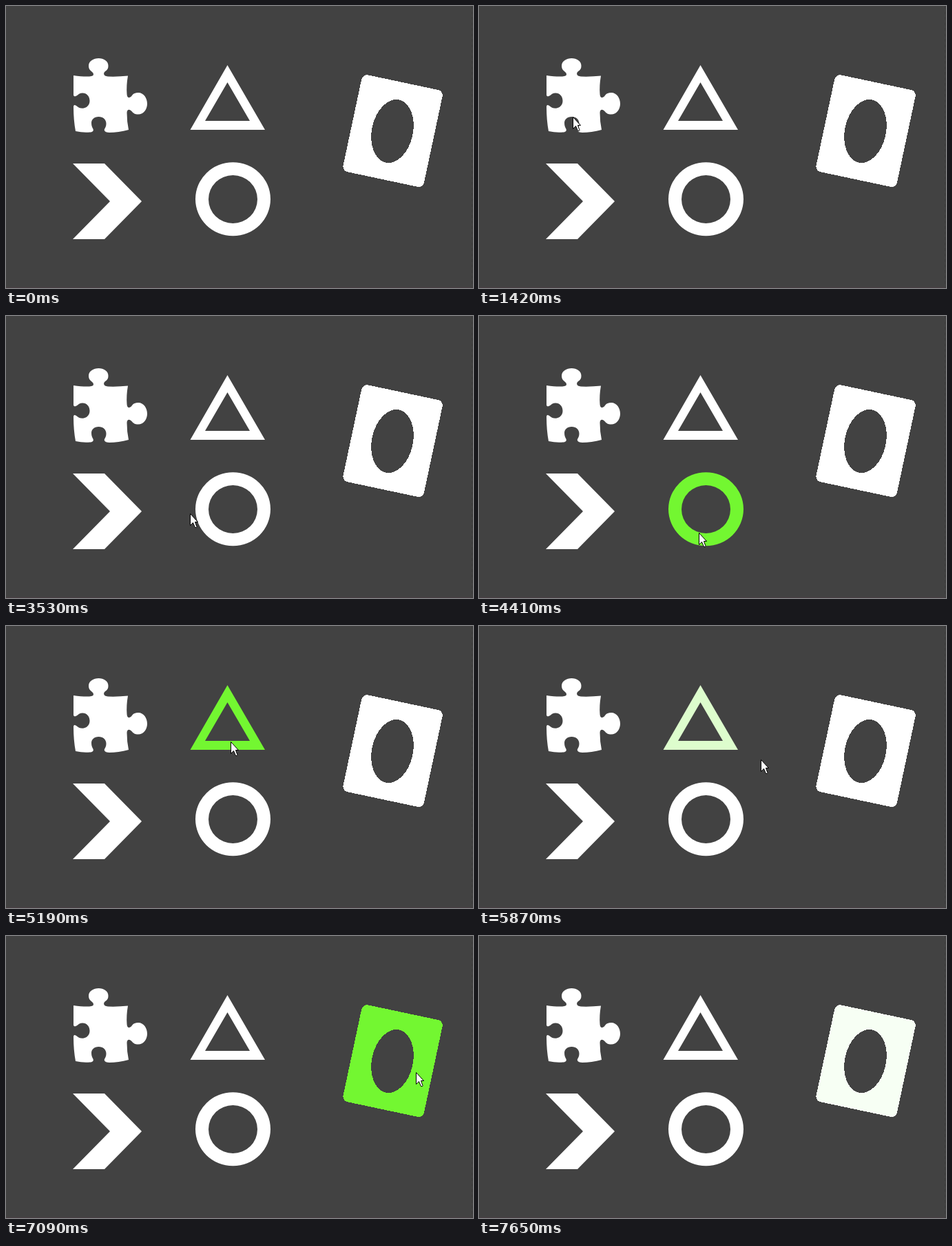
An HTML page that plays this animation: 678x410 px, repeating every 8 s.

```html
<!DOCTYPE html>
<html lang="en">
<head>
<meta charset="utf-8">
<title>Shape hover</title>
<style>
  html, body { margin: 0; width: 100%; height: 100%; overflow: hidden; background: #424242; }
  svg { display: block; width: 678px; height: 410px; }
  .shape { fill: #fff; fill-rule: evenodd; }
</style>
</head>
<body>
<svg viewBox="0 0 678 410">
  <rect width="678" height="410" fill="#424242"/>
  <rect y="409" width="678" height="1" fill="#493e43"/>
  <path d="M676.5 0V410" stroke="#3b3b3b" stroke-dasharray="4 4"/>

  <!-- puzzle piece -->
  <path class="shape" d="M98 101Q112 103 121 102.5C130 102 127 97 124 95C121 93 120 90 120 87
    C120 80 127 76 134.5 76C142 76 148.5 80 148.5 87C148.5 91 147 93 144 95C141 97 141 102 148 102.5
    Q163 103 177 101.5Q174.5 116 175.5 128C176 136 181 133 183 130C185 127 188 126 192 126
    C200 126 205 134 205 142C205 150 200 157.5 192 157.5C187 157.5 185 156 183 153.5
    C180 150 176 149 175.5 155Q175.5 168 178 180Q163 184 150 184C144 184 142 181 143 179
    C144 177 145.5 175 145.5 171C145.5 165 141 161 134.5 161C128 161 124 165 124 170
    C124 174 125 176 126 178C128 181 126 183.5 122 183.5Q112 184.5 101 182Q98 166 98 147
    C98 142 101 144 104 146.5C106 148 108 148.7 111 148.7C117 148.7 121.5 144 121.5 138
    C121.5 131 117 126.5 111 126.5C108 126.5 106 127.5 104 129.5C101 132 98 132 98 129Z"/>
  <!-- triangle -->
  <path class="shape" d="M321.5 86L376 180H267.5ZM321.5 111L289 167H354Z"/>
  <!-- chevron -->
  <path class="shape" d="M97 229H143L197 284L143 339H97L151 284Z"/>
  <!-- ring -->
  <path class="shape" d="M275 280.8a54.5 53.5 0 0 1 109 0a54.5 53.5 0 0 1 -109 0Z
    M294 281a35.5 35 0 0 1 71 0a35.5 35 0 0 1 -71 0Z"/>
  <!-- card -->
  <path class="shape" transform="translate(561 182) rotate(12)" shape-rendering="crispEdges"
    d="M-51.5 -72.5h104a8 8 0 0 1 8 8v128a8 8 0 0 1 -8 8h-104a8 8 0 0 1 -8 -8v-128a8 8 0 0 1 8 -8Z
    M-29.9 0a29.9 46.6 0 0 1 59.8 0a29.9 46.6 0 0 1 -59.8 0Z"/>

  <path id="cursor" fill="#fff" stroke="#000"
    d="M-.5 -.5V16.5L3.5 12.5L6.5 19.5H8.5L9 18.5L6.5 11.5H10.5Z"/>
</svg>
<script>
const LOOP = 8000;
const STEP = 1000 / 9;   // the picture advances nine times a second
const LEAD = 74;
const LAST = 68;         // nothing moves after this step
const FADE = 240 / STEP; // fade length in steps
const GREEN = [115, 247, 49];

// Turning points of the cursor tip: step, x, y. Both ends lie off stage.
const route = [
  [-1, 690, 480], [0, 481, 371], [7, 157, 193], [9, 139, 192], [12, 137, 162],
  [13, 135, 150], [15, 135, 150], [20, 111, 241], [21, 111, 241], [23, 125, 276],
  [29, 255, 281], [39, 320, 316], [45, 326, 174], [48, 330, 160], [50, 356, 176.5],
  [52, 410, 195], [53, 474, 203], [56, 543, 205], [58, 556, 205], [66, 620, 196],
  [67, 700, 200]
];

const svg = document.querySelector("svg");
const cursor = document.getElementById("cursor");
const shapes = [...document.querySelectorAll(".shape")];
const mix = (a, b, u) => a + (b - a) * u;

function tipAt(step) {
  const next = route.findIndex(([k]) => k > step);
  if (next < 1) return route.at(next).slice(1);
  const [k0, x0, y0] = route[next - 1];
  const [k1, x1, y1] = route[next];
  const u = (step - k0) / (k1 - k0);
  return [mix(x0, x1, u), mix(y0, y1, u)];
}

function isOver(shape, [x, y]) {
  const point = svg.createSVGPoint();
  point.x = x;
  point.y = y;
  return shape.isPointInFill(point.matrixTransform(shape.getCTM().inverse()));
}

// A shape is green under the tip and fades to white once the tip has left it.
function tint(shape, trail) {
  const seen = trail.find(({ tip }) => isOver(shape, tip));
  const u = seen ? seen.age / FADE : 1;
  return `rgb(${GREEN.map(c => Math.round(mix(c, 255, u)))})`;
}

function draw(step) {
  const trail = [];
  for (let age = 0; age < FADE; age += 0.04) trail.push({ age, tip: tipAt(step - age) });
  for (const shape of shapes) shape.style.fill = tint(shape, trail);
  cursor.setAttribute("transform", `translate(${tipAt(step).map(Math.round)})`);
}

const start = performance.now();
let shown;
function tick() {
  const t = (performance.now() - start) % LOOP;
  const step = Math.min(LAST, Math.floor((t - LEAD) / STEP));
  if (step !== shown) draw(shown = step);
  requestAnimationFrame(tick);
}
tick();
</script>
</body>
</html>
```
